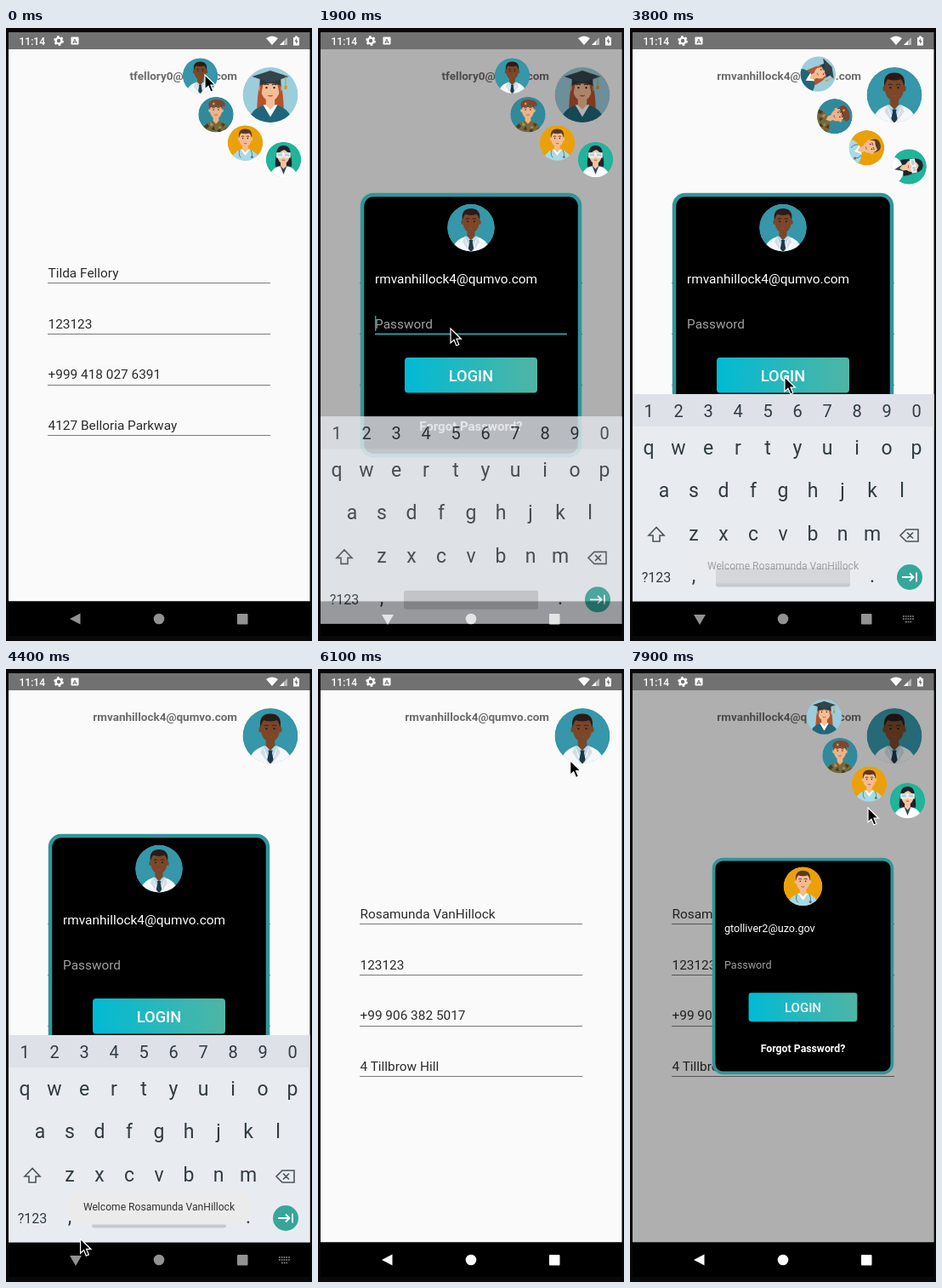
An HTML page for the animation above (8000 ms loop, 360x720 px).

```html
<!DOCTYPE html>
<html lang="en">
<head>
<meta charset="utf-8">
<title>Account switcher</title>
<style>
  html, body { margin: 0; height: 100%; overflow: hidden; background: #0a0708; }
  svg { display: block; width: 100vw; height: 100vh; }
  text { font: 15.4px Roboto, Arial, sans-serif; white-space: pre; }
  .form text { fill: #2b2b2b; }
  .form path { stroke: #7a7a7a; }
  #mail { font-size: 13.5px; font-weight: 700; fill: #6b6b6b; text-anchor: end; }
  #dialog text { fill: #fff; }
  #dialog .mid { text-anchor: middle; font-weight: 700; font-size: 15px; }
  #dialog .login { font-weight: 500; font-size: 18.3px; }
  #keyboard text { font-size: 23px; fill: #303b42; text-anchor: middle; }
  #keyboard .num { font-size: 20px; }
  #keyboard .alt { font-size: 16px; }
  .line { fill: none; stroke: #4a545a; stroke-width: 1.6; }
</style>
</head>
<body>
<svg viewBox="0 0 360 720">
  <defs>
    <clipPath id="round"><circle r="50"/></clipPath>
    <linearGradient id="teal"><stop stop-color="#00bad4"/><stop offset="1" stop-color="#50b5a4"/></linearGradient>
    <g id="face">
      <path d="M-11-18q4-2.500 8 0M3-18q4-2.500 8 0" fill="none" stroke="#3a2418" stroke-width="1.800"/>
      <circle cx="-7" cy="-13" r="1.800" fill="#2a1a14"/><circle cx="7" cy="-13" r="1.800" fill="#2a1a14"/>
      <path d="M-4 1Q0 3 4 1" fill="none" stroke="#8e4a3a" stroke-width="1.800"/>
    </g>
    <g id="people"></g>
  </defs>

  <rect x="3" y="25" width="354.5" height="648.5" fill="#fafafa"/>
  <g class="form">
    <text id="name" x="49.5" y="293.3"/>
    <text x="49.5" y="352.800">123123</text>
    <text id="phone" x="49.5" y="412.4"/>
    <text id="street" x="49.5" y="472"/>
    <path d="M49 299.5H311M49 359.5H311M49 419.5H311M49 478.5H311"/>
  </g>
  <text id="mail" x="272" y="60.800"/>
  <use id="main" transform="translate(311 78.500) scale(.65)"/>
  <rect id="dim" x="3" y="25" width="354.5" height="648.5"/>
  <g id="sats"></g>

  <g id="dialog">
    <rect x="52" y="196" width="256" height="306" rx="13" stroke="#30959a" stroke-width="4.5"/>
    <use id="who" transform="translate(180 234.500) scale(.56)"/>
    <text id="login" x="67" y="300"/>
    <text id="secret" x="67" y="352.500"/>
    <g id="focus"><path d="M67 359.500H293" stroke="#2f9a95" stroke-width="2"/><path id="caret" stroke="#2f9a95" stroke-width="1.500"/></g>
    <rect x="102" y="387" width="156" height="41.500" rx="4" fill="url(#teal)"/>
    <text class="mid login" x="180" y="415">LOGIN</text>
    <text class="mid" x="180" y="472.500">Forgot Password?</text>
  </g>

  <rect x="3" y="673.5" width="354.5" height="40.5"/>
  <rect id="ripple" x="38" y="674" width="88" height="40" rx="20" fill="#1d1d1d"/>
  <g id="keyboard">
    <rect x="3" y="430" width="354.5" height="243.5" fill="#e8ecf1"/>
    <rect x="3" y="430" width="354.5" height="38" fill="#dee2e8"/>
    <rect x="101" y="634.500" width="158" height="22" rx="3" fill="#c6c9cd"/>
    <g id="keys"></g>
    <text class="alt" x="31" y="650.500">?123</text>
    <path class="line" d="M31 586.500L22 596H27V603H35V596H40zM325 589H339V603H325L318 596zM326 592.500l7 7m0-7l-7 7"/>
    <circle cx="329" cy="645" r="15" fill="#36a69b"/>
    <path d="M320 645H333M329 640.500L333.500 645L329 649.500M337 639.500V650.500" fill="none" stroke="#fff" stroke-width="1.800"/>
  </g>
  <rect x="3" y="673.5" width="354.5" height="40.5" opacity=".22"/>
  <g id="nav">
    <path id="back"/>
    <circle cx="180" cy="694" r="6.300"/>
    <rect x="272" y="688" width="12.500" height="12.500" rx="1"/>
    <path id="switch" d="M321 691H334M321 694H334M324 697.500H331" fill="none" stroke="#999" stroke-width="1.600" stroke-dasharray="1.700 1.100"/>
  </g>

  <rect x="3" y="5" width="354.5" height="20" fill="#717171"/>
  <g fill="#fff">
    <text x="15.500" y="19.500" style="font-size:12px;font-weight:500">11:14</text>
    <circle cx="62" cy="15" r="3.400" fill="none" stroke="#fff" stroke-width="2.400"/>
    <circle cx="62" cy="15" r="5" fill="none" stroke="#fff" stroke-width="1.800" stroke-dasharray="2.600 2.636"/>
    <rect x="76.500" y="10.500" width="9" height="9" rx="1"/>
    <text x="81" y="18" text-anchor="middle" style="font-size:8px;font-weight:700" fill="#717171">A</text>
    <path d="M306 12Q313 7 320 12L313 20z"/>
    <path d="M322 20L331 11V20z" opacity=".5"/><path d="M322 20L327 15V20z"/>
    <path d="M338 11h2v-1.500h3V11h2v9.500h-7z"/>
    <path d="M342 12l-2.500 4h1.700v3l2.500-4H342z" fill="#717171"/>
  </g>

  <g id="toast">
    <rect x="70" y="611" width="220" height="41.5" rx="20.700" fill="#ebebeb"/>
    <text x="180" y="636.200" text-anchor="middle" style="font-size:12.100px" fill="#333">Welcome Rosamunda VanHillock</text>
  </g>
  <path id="cursor" d="M0 0V17L4 13.300L6.800 20L9.800 18.700L7 12.200H12.400z" stroke="#fff" stroke-width="1.200"/>
</svg>
<script>
const $ = id => document.getElementById(id);
const set = (el, attrs) => { for (const k in attrs) el.setAttribute(k, attrs[k]); };
const path = (fill, d) => `<path fill="${fill}" d="${d}"/>`;

const torso = 'M-39 52Q-38 27-13 19H13Q38 27 39 52z';
const crop = 'M-18-14Q-22-40 0-40Q22-40 18-14Q16-24 12-28Q0-24-12-28Q-16-24-18-14z';

function person(id, bg, skin, behind, front) {
  return `<g id="${id}" clip-path="url(#round)"><circle r="50" fill="${bg}"/>${behind}
    <g fill="${skin}"><path d="M-8 0H8V18L0 27L-8 18z"/><path d="M-17-28H17V-8Q15 8 0 12Q-15 8-17-8z"/>
    <ellipse cx="-18" cy="-11" rx="3" ry="5"/><ellipse cx="18" cy="-11" rx="3" ry="5"/></g>
    <use href="#face"/>${front}</g>`;
}

$('people').innerHTML =
  person('doctor', '#3597a9', '#7b4728',
    path('#f5f7fa', torso) + path('#b3d8ea', 'M-13 18L0 50L13 18z'),
    path('#2b1b17', crop) + path('#1c394a', 'M-4 26H4L3 31L6 44L0 51L-6 44L-3 31z')
    + path('#d5dde3', 'M-13 18L-18 30L-3 51L-9 33zM13 18L18 30L3 51L9 33z')) +
  person('graduate', '#9bcddb', '#f5bd93',
    path('#b5532e', 'M-20-18Q-27 26-22 40H22Q27 26 20-18z') + path('#20667a', torso) + path('#fff', 'M-13 18L0 40L13 18z'),
    path('#b5532e', 'M-19-22H19L20 10Q15-6 13-18Q0-24-13-18Q-15-6-20 10z')
    + path('#2b3941', 'M-19-32H19V-17Q0-24-19-17z') + path('#35434b', 'M0-44L33-33L0-22L-33-33z')
    + path('#c9952f', 'M27-34h1.500v18h2l-1 6h-4l-.500-6h2z')) +
  person('soldier', '#318a9b', '#eeb387',
    path('#77683b', torso) + path('#463d24', 'M-34 34l9-8 6 8-8 7zM-14 42l8-9 4 12zM14 24l12 4-6 9zM24 42l8-5 6 9-9 4zM4 44l8-4 4 10H5z')
    + path('#a99359', 'M-16 20l9 10-9 4zM8 32l8 5-7 4z'),
    path('#513423', 'M-18-12V-25H18V-12L15-21H-15z') + path('#7e4630', 'M-20-22Q-25-42 2-42Q30-40 25-22Q14-28-20-22z')
    + path('#e1ac37', 'M-9-33h5v6h-5z')) +
  person('nurse', '#eaa109', '#f4bb8e',
    path('#a6dbe7', torso) + path('#fff', 'M-13 18L0 36L13 18z'),
    path('#5b3826', crop)
    + '<path d="M-16 21Q-20 36-12 42M16 21Q22 30 19 38" fill="none" stroke="#58717e" stroke-width="2"/><circle cx="19" cy="40" r="3.500" fill="#58717e"/>') +
  person('chemist', '#20b49a', '#f3c6a1',
    path('#20232a', 'M-19-22Q-25 8-23 20H23Q25 8 19-22z') + path('#fff', torso) + path('#35455a', 'M-9 19L0 42L9 19z'),
    path('#20232a', 'M-20-2Q-24-40 0-40Q24-40 20-2Q18-20 2-28Q-16-22-20-2z')
    + path('#f2f7f8', 'M-20-20H20V-5H4L0-9L-4-5H-20z') + path('#b5d2da', 'M-16-17H-3V-9H-16zM3-17H16V-9H3z')
    + path('#c85858', 'M-4 1H4Q0 5-4 1z'));

const users = {
  graduate: ['tfellory0@zobdi.com', 'Tilda Fellory', '+999 418 027 6391', '4127 Belloria Parkway'],
  doctor: ['rmvanhillock4@qumvo.com', 'Rosamunda VanHillock', '+99 906 382 5017', '4 Tillbrow Hill'],
  nurse: ['gtolliver2@uzo.gov']
};

const key = (c, x, y, cls = '') => `<text class="${cls}" x="${x}" y="${y}">${c}</text>`;
const row = (chars, x, y, cls) => [...chars].map((c, i) => key(c, x + 35 * i, y, cls)).join('');
$('keys').innerHTML = row('1234567890', 22, 457, 'num') + row('qwertyuiop', 22, 500.5)
  + row('asdfghjkl', 40, 551) + row('zxcvbnm', 75, 602) + key(',', 75, 650.5) + key('.', 285, 650.5);

const spots = [[228.5, 56], [247, 101.5], [281.5, 135], [326.5, 154.5]];
const sats = spots.map(() => $('sats').appendChild(document.createElementNS('http://www.w3.org/2000/svg', 'use')));

// time, x, y of the pointer tip
const route = [
  [0, 234, 55], [200, 234, 55], [700, 204, 238], [1000, 204, 238], [1600, 156, 353], [2900, 156, 353],
  [3200, 182, 410], [3900, 182, 410], [4500, 80, 690], [4900, 80, 690], [5200, 100, 621], [5500, 104, 610],
  [6200, 308, 78], [6400, 308, 78], [6900, 266, 228], [7100, 266, 228], [7450, 282, 138], [7600, 282, 138],
  [7900, 280, 163], [8000, 280, 163]
];

const prog = (t, a, b) => Math.min(1, Math.max(0, (t - a) / (b - a)));
const decel = u => 1 - (1 - u) ** 2;
const smooth = u => u * u * (3 - 2 * u);
const anticipate = u => u * u * (3 * u - 2);
const overshoot = u => (u - 1) ** 2 * (1.9 * (u - 1) + .9) + 1;

function pointer(t) {
  const i = route.findIndex(p => p[0] > t);
  const [a, ax, ay] = route[i - 1], [b, bx, by] = route[i];
  const u = smooth(prog(t, a, b));
  return `translate(${ax + (bx - ax) * u} ${ay + (by - ay) * u})`;
}

function drawSats(t, swapped) {
  const faces = [swapped ? 'graduate' : 'doctor', 'soldier', 'nurse', 'chemist'];
  sats.forEach((el, i) => {
    const opening = t > 5500;
    const start = opening ? 6320 + 20 * i : 3665 - 10 * i;
    const u = prog(t, start, start + 500);
    const k = opening ? overshoot(u) : 1 - anticipate(u);
    const [x, y] = spots[i], size = Math.min(1, Math.max(0, k));
    set(el, {
      href: '#' + faces[i],
      opacity: size,
      transform: `translate(${311 + (x - 311) * k} ${78 + (y - 78) * k}) rotate(${720 * (k - 1)}) scale(${.415 * size})`
    });
  });
}

function draw(t) {
  const swapped = t >= 3300, second = t > 6000;
  const user = swapped ? 'doctor' : 'graduate', target = second ? 'nurse' : 'doctor';
  ['mail', 'name', 'phone', 'street'].forEach((id, i) => $(id).textContent = users[user][i]);
  set($('main'), { href: '#' + user });
  set($('who'), { href: '#' + target });
  $('login').textContent = users[target][0];

  set($('dim'), { opacity: .3 * (prog(t, 200, 450) - prog(t, 3250, 3600) + prog(t, 7600, 7800)) });
  drawSats(t, swapped);

  const size = second ? decel(prog(t, 7670, 8070))
    : decel(prog(t, 250, 650)) - decel(prog(t, 4850, 5100));
  set($('dialog'), {
    transform: `translate(310 349) scale(${size}) translate(-310 -349)`,
    visibility: size > 0 ? 'visible' : 'hidden'
  });

  const focused = t >= 1800 && t < 3300;
  const typed = focused ? Math.floor(6 * prog(t, 2200, 2900)) : 0;
  $('secret').textContent = typed ? '•'.repeat(typed) : 'Password';
  set($('secret'), { style: `fill:${typed ? '#fff' : '#a0a0a0'}` });
  set($('focus'), { opacity: +focused });
  set($('caret'), {
    d: `M${67.7 + typed * 5.6} 338V356`,
    opacity: +(Math.floor((t - 1800) / 500) % 2 === 0)
  });

  const up = decel(prog(t, 1820, 2050)) - prog(t, 4600, 4800);
  set($('keyboard'), {
    transform: `translate(0 ${62 * (1 - up)})`,
    opacity: Math.min(1, up * 1.45)
  });
  const ime = up > 0, bright = t >= 4600 || (t > 1820 && t < 2050);
  set($('nav'), { fill: !bright ? '#929292' : t < 4600 ? '#e4e4e4' : '#fff' });
  set($('back'), { d: ime ? 'M75 689H89L82 701z' : 'M87.500 687.500V700.500L75 694z' });
  set($('switch'), { opacity: +ime });
  set($('ripple'), { opacity: prog(t, 4500, 4700) - prog(t, 5200, 5450) });
  set($('toast'), { opacity: prog(t, 3660, 4010) - prog(t, 5600, 5900) });
  set($('cursor'), { transform: pointer(t) });
}

const begin = performance.now();
function frame() {
  draw(Math.floor((performance.now() - begin) % 8000 / 100) * 100);
  requestAnimationFrame(frame);
}
frame();
</script>
</body>
</html>
```
